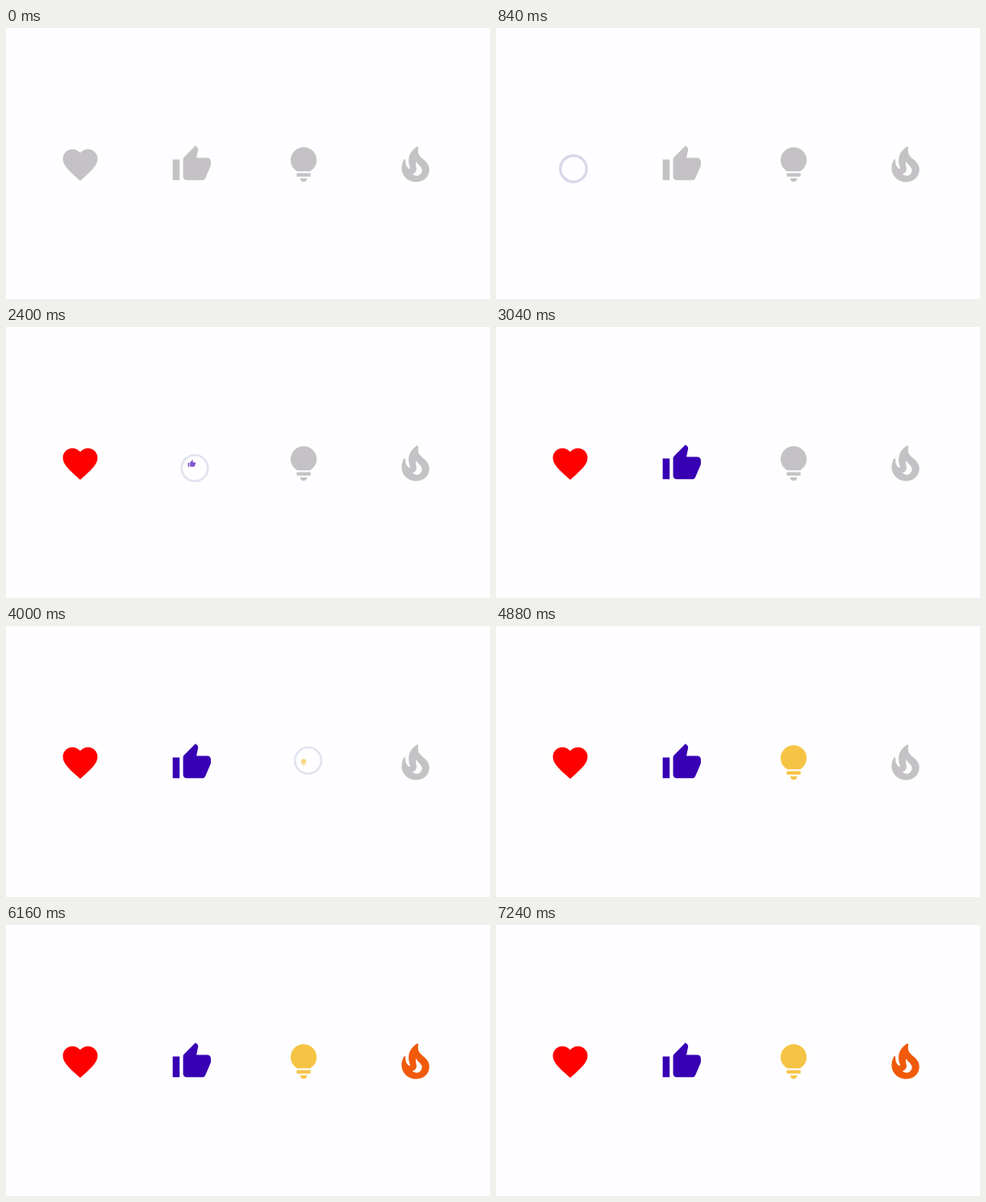
Animation of 600 by 337 pixels, one loop 7.28 s. Source, as an HTML page:

```html
<!DOCTYPE html>
<html lang="en">
<head>
<meta charset="utf-8">
<title>Reaction icons</title>
<style>
html, body { margin: 0; width: 100%; height: 100%; overflow: hidden; background: #fefdff; }
svg { display: block; width: 100%; height: 100%; }
</style>
</head>
<body>
<svg id="stage" viewBox="0 0 600 337" preserveAspectRatio="none"></svg>
<script>
const LOOP = 7280, SIZE = 2.15, GREY = '#c4c2c5';
const GROW = 420, RAY_START = 190, RAY_TIME = 370, RING_FADE = 300;

// press: pointer goes down; tap: icon starts to pop
const icons = [
  { x: 92, y: 170, color: '#ff0000', ray: '#e60a14', press: 720, tap: 838, touch: [96, 175],
    d: 'M12 21.35l-1.45-1.32C5.4 15.36 2 12.28 2 8.5 2 5.42 4.42 3 7.5 3c1.74 0 3.41.81 4.5 2.09C13.09 3.81 14.76 3 16.5 3 19.58 3 22 5.42 22 8.5c0 3.78-3.4 6.86-8.55 11.54L12 21.35z' },
  { x: 230.3, y: 170, color: '#3700b3', ray: '#3700b3', press: 2280, tap: 2318, touch: [234, 175.5],
    d: 'M1 21h4V9H1v12zm22-11c0-1.1-.9-2-2-2h-6.31l.95-4.57.03-.32c0-.41-.17-.79-.44-1.06L14.17 1 7.59 7.59C7.22 7.95 7 8.45 7 9v10c0 1.1.9 2 2 2h9c.83 0 1.54-.5 1.84-1.22l3.02-7.05c.09-.23.14-.47.14-.73v-2z' },
  { x: 369, y: 169.7, color: '#f6c445', ray: '#f6c445', press: 3720, tap: 3914, touch: [374.5, 167.3],
    d: 'M12 22c1.1 0 2-.9 2-2h-4c0 1.1.9 2 2 2zm-4-3h8v-2H8v2zM12 2C7.86 2 4.5 5.36 4.5 9.5c0 3.82 2.66 5.86 3.77 6.5h7.46c1.11-.64 3.77-2.68 3.77-6.5C19.5 5.36 16.14 2 12 2z' },
  { x: 507.6, y: 170, color: '#f05a0a', ray: '#f2a93c', press: 5475, tap: 5475, touch: [502, 178.5],
    d: 'M19.48 12.35c-1.57-4.08-7.16-4.3-5.81-10.23.1-.44-.37-.78-.75-.55C9.29 3.71 6.68 8 8.87 13.62c.18.46-.36.89-.75.59-1.81-1.37-2-3.34-1.84-4.75.06-.52-.62-.77-.91-.34C4.69 10.16 4 11.84 4 14.37c.38 5.6 5.11 7.32 6.81 7.54 2.43.31 5.06-.14 6.95-1.87 2.08-1.93 2.84-5.01 1.72-7.69zM10.2 17.38c1.44-.35 2.18-1.39 2.38-2.31.33-1.43-.96-2.83-.09-5.09.33 1.87 3.27 3.04 3.27 5.08.08 2.53-2.66 4.7-5.56 2.32z' }
];

const stage = document.getElementById('stage');
const clamp = v => Math.max(0, Math.min(1, v));

function set(el, attrs) {
  for (const key in attrs) el.setAttribute(key, attrs[key]);
}

function add(tag, attrs) {
  const el = document.createElementNS('http://www.w3.org/2000/svg', tag);
  set(el, attrs);
  return stage.appendChild(el);
}

for (const icon of icons) {
  icon.rays = add('path', { stroke: icon.ray, 'stroke-width': 2.6, fill: 'none' });
  icon.shape = add('path', { d: icon.d });
  icon.ring = add('circle', { cx: icon.touch[0], cy: icon.touch[1], fill: 'none', stroke: '#d8d8ea' });
}

function rayPath(cx, cy, inner, outer) {
  let d = '';
  for (let i = 0; i < 8; i++) {
    const c = Math.cos(i * Math.PI / 4), s = Math.sin(i * Math.PI / 4);
    d += `M${cx + c * inner} ${cy + s * inner}L${cx + c * outer} ${cy + s * outer}`;
  }
  return d;
}

function drawIcon(icon, time) {
  const t = time - icon.tap;
  const on = t >= 0;
  const scale = on ? clamp(t / GROW) : 1;
  set(icon.shape, {
    fill: on ? icon.color : GREY,
    opacity: on ? clamp(0.4 + scale * 1.3) : 1,
    transform: `translate(${icon.x} ${icon.y}) scale(${SIZE * scale}) translate(-12 -12)`
  });

  const u = (t - RAY_START) / RAY_TIME;
  const flying = u > 0 && u < 1;
  if (flying) {
    const outer = 5 + 43 * (1 - Math.pow(1 - u, 5));
    set(icon.rays, { d: rayPath(icon.x, icon.y, outer - 5.4 * (1 - u), outer) });
  }
  set(icon.rays, { visibility: flying ? 'visible' : 'hidden' });

  const held = clamp((time - icon.press) / 100);
  const left = 1 - clamp(t / RING_FADE);
  set(icon.ring, {
    r: 8 + 8.3 * held,
    'stroke-width': 0.6 + 2.8 * left,
    opacity: held * left
  });
}

function draw(now) {
  const time = now % LOOP;
  for (const icon of icons) drawIcon(icon, time);
}

const start = performance.now();
function tick() {
  draw(performance.now() - start);
  requestAnimationFrame(tick);
}
tick();
</script>
</body>
</html>
```
